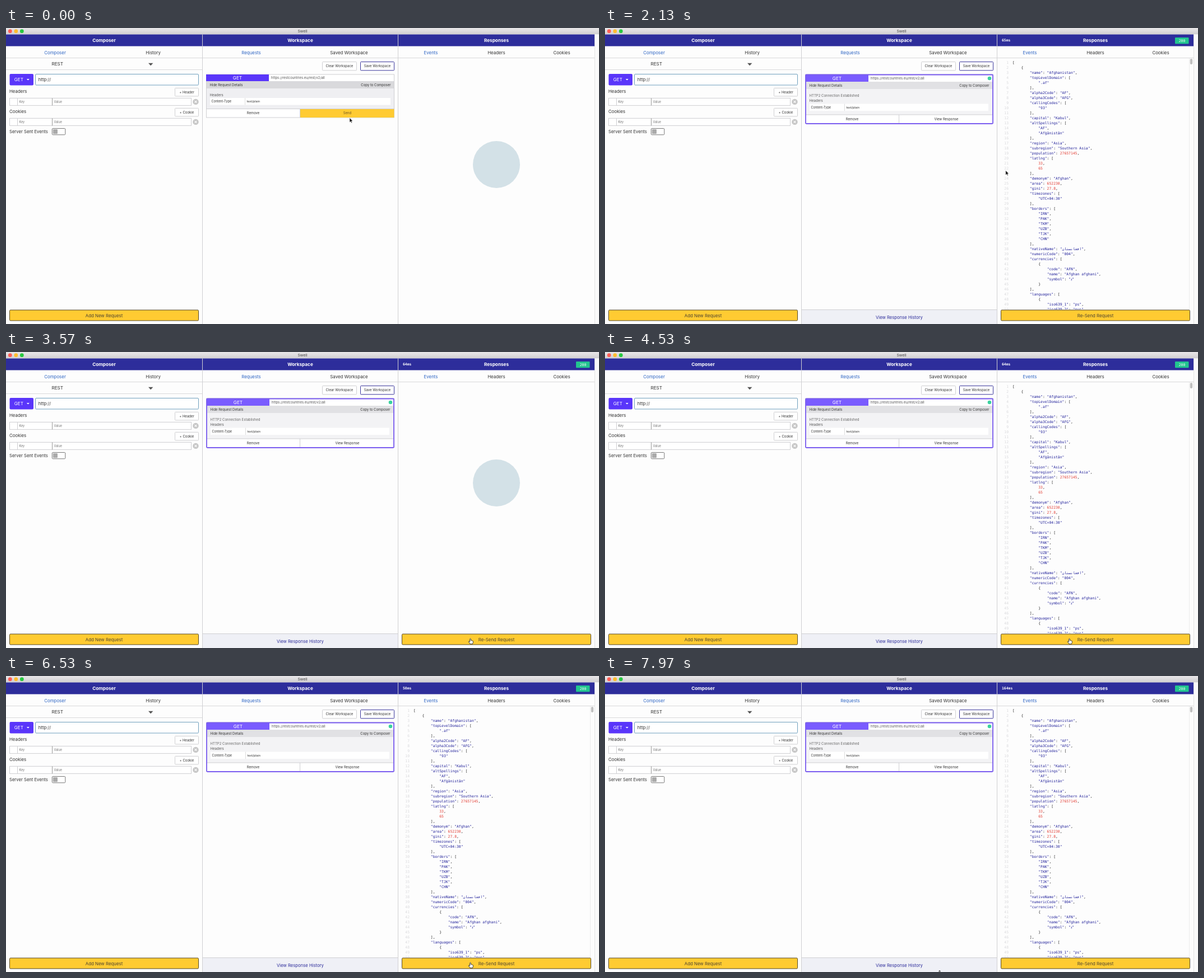
Write an HTML page that moves like this. It is 1058 px wide and 529 px high and loops after 8000 ms.

```html
<!DOCTYPE html>
<html lang="en">
<head>
<meta charset="utf-8">
<title>Swell</title>
<style>
  html, body { margin: 0; height: 100%; overflow: hidden; background: #fdfdfd; }
  svg { display: block; width: 100vw; height: 100vh; }
  text { font-family: Inter, "Open Sans", sans-serif; white-space: pre; }
  .mono { font-family: "DejaVu Sans Mono", monospace; }
</style>
</head>
<body>
<svg id="stage" viewBox="0 0 1058 529">
  <defs>
    <linearGradient id="bar" x2="0" y2="1">
      <stop stop-color="#e9e7e9"/><stop offset="1" stop-color="#d0ced0"/>
    </linearGradient>
    <clipPath id="pane"><rect x="700" y="54" width="350" height="449"/></clipPath>
  </defs>
</svg>
<script>
const stage = document.getElementById('stage');
const NAVY = '#2d2d9b', VIOLET = '#5a36fa', YELLOW = '#ffcb32', LINE = '#cfcfd2', INK = '#333';
let layer = stage;

function add(tag, attrs, parent = layer) {
  const el = document.createElementNS('http://www.w3.org/2000/svg', tag);
  for (const k in attrs) el.setAttribute(k, attrs[k]);
  return parent.appendChild(el);
}
function group(draw, attrs = {}) {
  const outer = layer, g = add('g', attrs);
  layer = g;
  draw();
  layer = outer;
  return g;
}
const box = (x1, y1, x2, y2, fill, stroke = 'none', rx = 0, width = 1) =>
  add('rect', { x: x1, y: y1, width: x2 - x1, height: y2 - y1, fill, stroke, rx, 'stroke-width': width });
const dot = (cx, cy, r, fill) => add('circle', { cx, cy, r, fill });
const line = (x1, y1, x2, y2, stroke = LINE) => add('line', { x1, y1, x2, y2, stroke });
const path = (d, fill, more = {}) => add('path', { d, fill, ...more });

// y is the middle of the capitals
function label(str, x, y, size, fill = INK, anchor = 'start', more = {}) {
  const el = add('text', { x, y: y + size * .364, 'font-size': size, fill, 'text-anchor': anchor, ...more });
  el.textContent = str;
  return el;
}
const mid = (str, x, y, size, fill, more) => label(str, x, y, size, fill, 'middle', more);

function button(str, x1, y1, x2, y2, stroke = LINE) {
  box(x1, y1, x2, y2, '#fff', stroke, 1);
  mid(str, (x1 + x2) / 2, (y1 + y2) / 2, 6);
}
function bigButton(str, x) {
  box(x, 504, x + 337, 523, YELLOW, '#55492a', 1.5);
  mid(str, x + 168.5, 514, 7.85, '#4a4330');
}
function pairEditor(name, add1, y) {
  label(name, 6, y, 7.9);
  button(add1, 301.5, y - 6, 343.5, y + 8.5);
  box(6.5, y + 12, 330.5, y + 25, '#fff', LINE);
  line(20.5, y + 12, 20.5, y + 25);
  line(82.5, y + 12, 82.5, y + 25, '#999');
  label('Key', 23.5, y + 18.8, 5.5, '#777');
  label('Value', 85.5, y + 18.8, 5.5, '#777');
  dot(338.5, y + 18.5, 5.2, '#c6c6c6');
  path(`M336.5 ${y + 16.5}l4 4m0-4l-4 4`, 'none', { stroke: '#fff', 'stroke-width': 1.1 });
}

// Request card; a sent card is inset by one pixel and has one more line of text
function card(sent) {
  const d = sent ? 1 : 0, grow = sent ? 10.5 : 0, end = 144.5 + grow;
  box(357.5, 83, 692.5, 160 + grow, '#fff', LINE);
  box(357 + d, 83 + d, 469 + d, 95 + d, sent ? '#7a5cff' : VIOLET);
  mid('GET', 413 + d, 89 + d, 8.2, '#fff');
  label('https://restcountries.eu/rest/v2/all', 473 + d, 89 + d, 5.95, '#555');
  box(358, 95 + d, 692, 108 + d, sent ? '#e1e1e4' : '#d9d9dc');
  label('Hide Request Details', 363.5 + d, 101.5 + d, 6);
  label('Copy to Composer', 686.5 - d, 101.5 + d, 6, INK, 'end');
  box(358, 108 + d, 692, end, sent ? '#f3f3f5' : '#efeff2');
  if (sent) label('HTTP2 Connection Established', 364.5, 120.3, 6.05, '#666');
  label('Headers', 363.5 + d, 119.3 + grow, 6.05, '#555');
  box(364 + d, 125 + grow, 686 - 2 * d, 137.5 + grow, '#fff');
  line(426.5 + d, 125 + grow, 426.5 + d, 137.5 + grow, '#ddd');
  label('Content-Type', 366.5 + d, 131.3 + grow, 5.5);
  label('text/plain', 429.5 + d, 131.3 + grow, 5.4);
  if (!sent) box(525, end, 692.5, 160, YELLOW);
  line(358, end, 692, end, LINE);
  line(524.5, end, 524.5, 160 + grow, LINE);
  mid('Remove', 441, 152.2 + grow, 5.95);
  mid(sent ? 'View Response' : 'Send', 609, 152.2 + grow, 5.95, sent ? INK : '#6b5420');
  if (sent) {
    box(358, 83.5, 692, 171, 'none', '#7a5cf0', 1.5, 1.8);
    dot(686, 90, 3.3, '#3bd19f');
  }
}

const country = [{
  name: 'Afghanistan', topLevelDomain: ['.af'], alpha2Code: 'AF', alpha3Code: 'AFG',
  callingCodes: ['93'], capital: 'Kabul', altSpellings: ['AF', 'Afġānistān'],
  region: 'Asia', subregion: 'Southern Asia', population: 27657145, latlng: [33, 65],
  demonym: 'Afghan', area: 652230, gini: 27.8, timezones: ['UTC+04:30'],
  borders: ['IRN', 'PAK', 'TKM', 'UZB', 'TJK', 'CHN'],
  nativeName: 'افغانستان', numericCode: '004',
  currencies: [{ code: 'AFN', name: 'Afghan afghani', symbol: '؋' }],
  languages: [{ iso639_1: 'ps', iso639_2: 'pus', name: 'Pashto' }]
}];

function jsonView() {
  const size = 6.4, advance = size * .602;
  JSON.stringify(country, null, 4).split('\n').slice(0, 50).forEach((row, i) => {
    const y = 61.4 + i * 9, code = row.trimStart();
    label(i + 1, 720, y, size, '#d9d9dc', 'end', { class: 'mono' });
    const el = label('', 727 + (row.length - code.length) * advance, y, size, '#222', 'start', { class: 'mono' });
    for (const part of code.match(/"[^"]*"|[\d.]+|[^"\d]+/g)) {
      const fill = part[0] === '"' ? '#20209a' : /\d/.test(part) ? '#e23a30' : '#222';
      add('tspan', { fill }, el).textContent = part;
    }
  });
  line(1042.5, 54, 1042.5, 503, '#ececec');
  box(1043.8, 55, 1048.2, 65, '#c1c1c1', 'none', 2);
}

// Window frame and column headings
box(0, 0, 1058, 529, '#fdfdfd');
box(0, 0, 1058, 11.5, 'url(#bar)');
['#ff5f57', '#febc2e', '#28c840'].forEach((c, i) => dot(7.3 + i * 10.5, 5.7, 3.4, c));
mid('Swell', 529, 6, 6.8, '#444');
box(0, 11.5, 1050, 32.5, NAVY);
['Composer', 'Workspace', 'Responses'].forEach((s, i) =>
  mid(s, 175 + i * 350, 22, 8.2, '#fff', { 'font-weight': 700 }));
[['Composer', 87.5], ['History', 262.5], ['Requests', 437.5], ['Saved Workspace', 612],
 ['Events', 758], ['Headers', 875], ['Cookies', 991.5]].forEach(([s, x], i) =>
  mid(s, x, 43.7, 7.9, [0, 2, 4].includes(i) ? '#2f66c4' : INK));
line(0, 53.5, 1050, 53.5, '#d8d8da');
line(0, 74.5, 350, 74.5, '#d8d8da');
line(350.5, 11.5, 350.5, 529);
line(699.5, 11.5, 699.5, 529);
box(1050, 11.5, 1058, 529, '#fafafa');
line(1050.5, 11.5, 1050.5, 529, '#e4e4e4');

// Composer
label('REST', 81.5, 64.5, 8.1);
path('M254 62.8h8.4l-4.2 4.4z', '#555');
box(6.5, 82, 49, 102.5, VIOLET, 'none', 2);
label('GET', 14.8, 92, 8.1, '#fff');
path('M36.8 91h5l-2.5 2.6z', '#fff');
box(52.5, 82.5, 343.5, 102, '#fff', '#6f9fbd', 1.5);
label('http://', 57.8, 92, 7.8);
pairEditor('Headers', '+ Header', 113.4);
pairEditor('Cookies', '+ Cookie', 149.4);
label('Server Sent Events', 6, 185, 7.65);
box(82.3, 179.5, 105.8, 190.8, '#fff', '#777', 1.5);
box(83.8, 181, 92, 189.3, '#aaa', 'none', 1);
bigButton('Add New Request', 6.5);

// Workspace
button('Clear Workspace', 564.5, 60.5, 625.5, 75.8);
button('Save Workspace', 632.5, 60.5, 692.5, 75.8, '#3a369c');
const draftCard = group(() => card(false));
const sentCard = group(() => card(true));

// Responses
const logo = dot(875, 244, 42, '#d3e1e7');
const json = group(jsonView, { 'clip-path': 'url(#pane)' });
let timing;
const sentParts = group(() => {
  timing = label('', 708, 22, 6.4, '#fff', 'start', { class: 'mono', 'font-weight': 700 });
  box(1017, 17, 1041.5, 28.3, '#22c58f', 'none', 1);
  mid('200', 1029.5, 22.5, 6.4, '#fff', { class: 'mono' });
  box(351, 503.5, 699, 529, '#eff0f6');
  line(351, 503.5, 699, 503.5);
  mid('View Response History', 525, 516.8, 7.7, NAVY);
  bigButton('Re-Send Request', 706.5);
});

// Pointers, both with the tip at 0,0
const arrow = path('M0 0V8.2L1.9 6.5 3.1 9.3 4.5 8.7 3.3 6H5.8Z', '#111', { stroke: '#fff', 'stroke-width': .6 });
const hand = path('M-.9 .8Q0-.6 .9 .8V3.4Q2 2.9 2.4 3.9 3.5 3.4 3.9 4.4 5 4.1 5 5.4 5 8 3.8 9.8H-.4Q-1.4 8-3.1 6.1-3.4 4.7-1.9 5.1L-.9 6Z',
  '#fff', { stroke: '#111', 'stroke-width': .8 });

// Sent at, shown from, reported duration
const responses = [[600, 1500, 65], [3000, 3900, 64], [4800, 5700, 50], [6900, 7500, 164]];
const route = [[0, 613, 160.5], [200, 613, 160.5], [400, 613, 154], [700, 614, 155], [970, 614.5, 155.2],
  [1750, 614.5, 155.2], [2130, 714.5, 254], [2500, 824, 480], [2700, 828.5, 512], [7550, 828.5, 512],
  [7970, 597, 526], [8000, 597, 526]];

const show = (el, on) => el.setAttribute('visibility', on ? 'visible' : 'hidden');

function frame(now) {
  const t = now % 8000;
  const last = responses.filter(r => t >= r[0]).pop();
  const shown = !!last && t >= last[1];
  show(draftCard, !last);
  show(sentCard, last);
  show(sentParts, last);
  show(json, shown);
  show(logo, !shown);
  logo.setAttribute('cy', last ? 234 : 244);
  timing.textContent = last ? last[2] + 'ms' : '';

  const i = route.findIndex(p => p[0] > t);
  const [t0, x0, y0] = route[i - 1], [t1, x1, y1] = route[i];
  const k = (t - t0) / (t1 - t0);
  const place = `translate(${x0 + (x1 - x0) * k} ${y0 + (y1 - y0) * k})`;
  const pointing = t > 300 && t < 1800 || t > 2620;
  arrow.setAttribute('transform', place);
  hand.setAttribute('transform', place);
  show(arrow, !pointing);
  show(hand, pointing);
  requestAnimationFrame(frame);
}
const start = performance.now();
requestAnimationFrame(function first() {
  (function loop() { frame0(); requestAnimationFrame(loop); })();
});
function frame0() {}
frame(Math.max(0, performance.now() - start));
</script>
</body>
</html>
```
